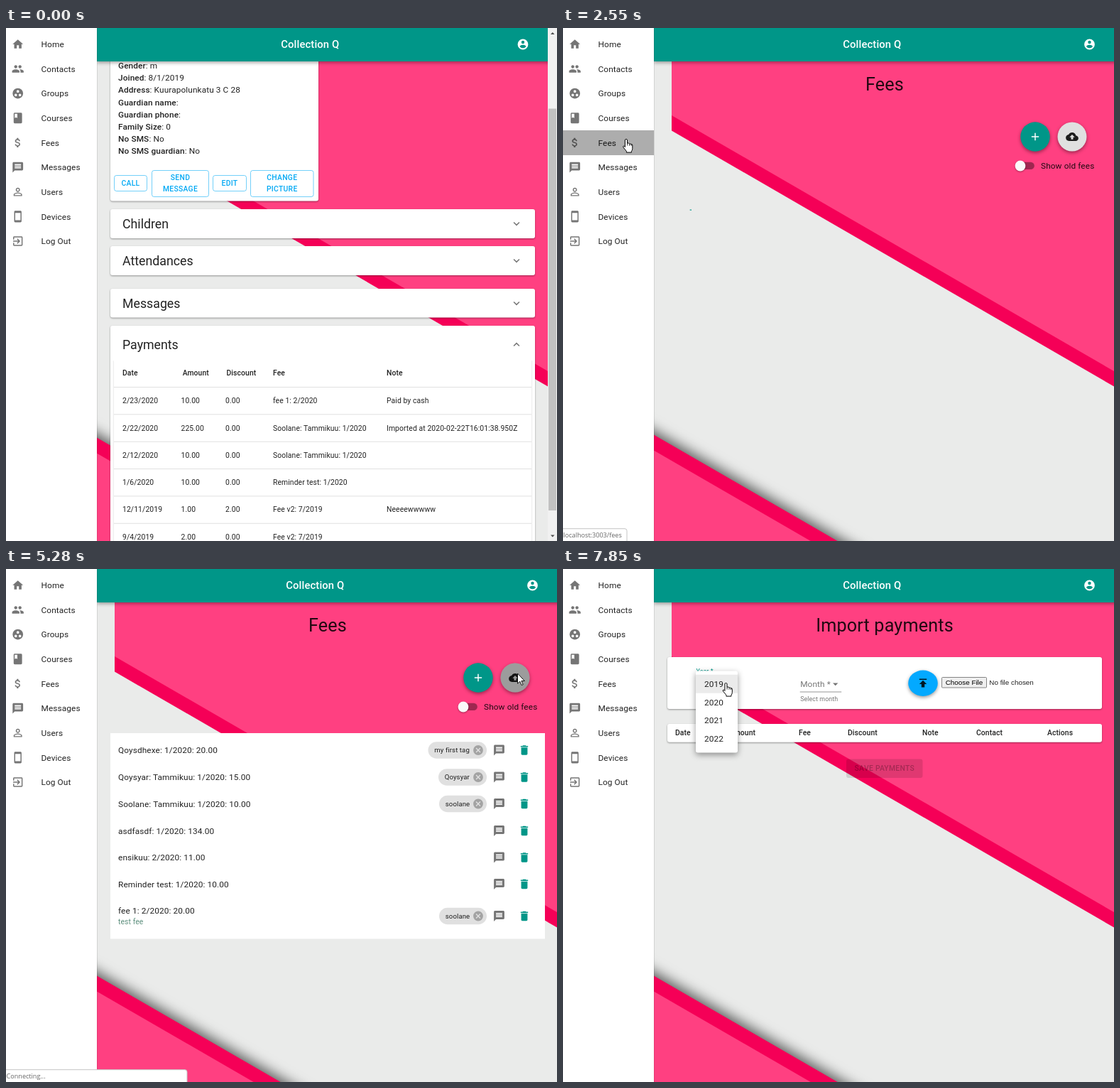
Recreate the animation shown at these times as an HTML page. Size 776 px wide and 722 px high, loop 8000 ms.

```html
<!DOCTYPE html>
<html lang="en">
<head>
<meta charset="utf-8">
<title>Fees</title>
<style>
html, body { margin: 0; width: 100%; height: 100%; overflow: hidden; background: #eaebea; }
svg { display: block; width: 776px; height: 722px; }
text { font-family: Roboto, sans-serif; letter-spacing: .009em; white-space: pre; }
.h4 { letter-spacing: .007em; }
.h5 { letter-spacing: 0; }
.m { font-weight: 500; }
.btn { font-weight: 500; letter-spacing: .028em; text-anchor: middle; }
.sys { font-family: "Liberation Sans", Arial, sans-serif; letter-spacing: 0; }
.tip { font-family: "Open Sans", sans-serif; letter-spacing: 0; }
.mid { text-anchor: middle; }
.paper { fill: #fff; filter: drop-shadow(0 1px 1px rgba(0,0,0,.38)); }
.fab { filter: drop-shadow(0 2px 2.5px rgba(0,0,0,.4)); }
.bar { filter: drop-shadow(0 2px 2.5px rgba(0,0,0,.35)); }
.pop { filter: drop-shadow(0 3px 4px rgba(0,0,0,.4)); }
.deep { filter: drop-shadow(2px -5px 9px rgba(0,0,0,.6)); }
</style>
</head>
<body>
<svg id="stage" viewBox="0 0 776 722"></svg>
<script>
const INK = 'rgba(0,0,0,.87)', GREY = 'rgba(0,0,0,.54)', TEAL = '#009688', BLUE = '#03a9f4';
const BODY = 11.84, SMALL = 10.36, TINY = 8.88;

const ICONS = {
  home: 'M10 20v-6h4v6h5v-8h3L12 3 2 12h3v8z',
  people: 'M16 11c1.66 0 2.99-1.34 2.99-3S17.66 5 16 5c-1.66 0-3 1.34-3 3s1.34 3 3 3zm-8 0c1.66 0 2.99-1.34 2.99-3S9.66 5 8 5C6.34 5 5 6.34 5 8s1.34 3 3 3zm0 2c-2.33 0-7 1.17-7 3.5V19h14v-2.5c0-2.33-4.67-3.5-7-3.5zm8 0c-.29 0-.62.02-.97.05 1.16.84 1.97 1.97 1.97 3.45V19h6v-2.5c0-2.33-4.67-3.5-7-3.5z',
  groups: 'M12 2a10 10 0 1 0 0 20a10 10 0 1 0 0-20zM8 17.5a2.5 2.5 0 1 1 0-5a2.5 2.5 0 1 1 0 5zM12 10.5a2.5 2.5 0 1 1 0-5a2.5 2.5 0 1 1 0 5zM16 17.5a2.5 2.5 0 1 1 0-5a2.5 2.5 0 1 1 0 5z',
  book: 'M18 2H6c-1.1 0-2 .9-2 2v16c0 1.1.9 2 2 2h12c1.1 0 2-.9 2-2V4c0-1.1-.9-2-2-2zM6 4h5v8l-2.5-1.5L6 12V4z',
  money: 'M11.8 10.9c-2.27-.59-3-1.2-3-2.15 0-1.09 1.01-1.85 2.7-1.85 1.78 0 2.44.85 2.5 2.1h2.21c-.07-1.72-1.12-3.3-3.21-3.81V3h-3v2.16c-1.94.42-3.5 1.68-3.5 3.61 0 2.31 1.91 3.46 4.7 4.13 2.5.6 3 1.48 3 2.41 0 .69-.49 1.79-2.7 1.79-2.06 0-2.87-.92-2.98-2.1h-2.2c.12 2.19 1.76 3.42 3.68 3.83V21h3v-2.15c1.95-.37 3.5-1.5 3.5-3.55 0-2.84-2.43-3.81-4.7-4.4z',
  message: 'M20 2H4c-1.1 0-1.99.9-1.99 2L2 22l4-4h14c1.1 0 2-.9 2-2V4c0-1.1-.9-2-2-2zm-2 12H6v-2h12v2zm0-3H6V9h12v2zm0-3H6V6h12v2z',
  person: 'M12 5.9c1.16 0 2.1.94 2.1 2.1s-.94 2.1-2.1 2.1S9.9 9.16 9.9 8s.94-2.1 2.1-2.1m0 9c2.97 0 6.1 1.46 6.1 2.1v1.1H5.9V17c0-.64 3.13-2.1 6.1-2.1M12 4C9.79 4 8 5.79 8 8s1.79 4 4 4 4-1.79 4-4-1.79-4-4-4zm0 9c-2.67 0-8 1.34-8 4v3h16v-3c0-2.66-5.33-4-8-4z',
  phone: 'M17 1H7c-1.1 0-2 .9-2 2v18c0 1.1.9 2 2 2h10c1.1 0 2-.9 2-2V3c0-1.1-.9-2-2-2zM17 19H7V5h10v14z',
  exit: 'M10.09 15.59L11.5 17l5-5-5-5-1.41 1.41L12.67 11H3v2h9.67l-2.58 2.59zM19 3H5c-1.11 0-2 .9-2 2v4h2V5h14v14H5v-4H3v4c0 1.1.89 2 2 2h14c1.1 0 2-.9 2-2V5c0-1.1-.9-2-2-2z',
  account: 'M12 2a10 10 0 1 0 0 20a10 10 0 1 0 0-20zm0 3a3 3 0 1 1 0 6a3 3 0 1 1 0-6zm0 14.2c-2.5 0-4.71-1.28-6-3.22.03-1.99 4-3.08 6-3.08 1.99 0 5.97 1.09 6 3.08-1.29 1.94-3.5 3.22-6 3.22z',
  add: 'M19 13h-6v6h-2v-6H5v-2h6V5h2v6h6v2z',
  cloud: 'M19.35 10.04C18.67 6.59 15.64 4 12 4 9.11 4 6.6 5.64 5.35 8.04 2.34 8.36 0 10.91 0 14c0 3.31 2.69 6 6 6h13c2.76 0 5-2.24 5-5 0-2.64-2.05-4.78-4.65-4.96zM14 13v4h-4v-4H7l5-5 5 5h-3z',
  trash: 'M6 19c0 1.1.9 2 2 2h8c1.1 0 2-.9 2-2V7H6v12zM19 4h-3.5l-1-1h-5l-1 1H5v2h14V4z',
  cancel: 'M12 2a10 10 0 1 0 0 20a10 10 0 1 0 0-20zm5 13.59L15.59 17 12 13.41 8.41 17 7 15.59 10.59 12 7 8.41 8.41 7 12 10.59 15.59 7 17 8.41 13.41 12 17 15.59z',
  publish: 'M5 4v2h14V4H5zm0 10h4v6h6v-6h4l-7-7-7 7z',
  more: 'M16.59 8.59L12 13.17 7.41 8.59 6 10l6 6 6-6z',
  less: 'M12 8l-6 6 1.41 1.41L12 10.83l4.59 4.58L18 14z',
  drop: 'M7 10l5 5 5-5z'
};

const T = (x, y, size, str, attrs = '') => `<text x="${x}" y="${y}" font-size="${size}" fill="${INK}" ${attrs}>${str}</text>`;
const R = (x, y, w, h, attrs = '') => `<rect x="${x}" y="${y}" width="${w}" height="${h}" ${attrs}/>`;
const C = (x, y, r, attrs = '') => `<circle cx="${x}" cy="${y}" r="${r}" ${attrs}/>`;
const P = (d, attrs = '') => `<path d="${d}" ${attrs}/>`;
const I = (name, x, y, fill = GREY, k = .74) =>
  P(ICONS[name], `fill="${fill}" fill-rule="evenodd" transform="translate(${x - 12 * k} ${y - 12 * k}) scale(${k})"`);
const G = (id, inner, attrs = '') => `<g id="${id}" ${attrs}>${inner}</g>`;
const each = (list, fn) => list.map(fn).join('');
const paper = (x, y, w, h, r = 3) => R(x, y, w, h, `rx="${r}" class="paper"`);

function backdrop(dx, dy, left) {
  const top = x => 123 + (x - 153 - dx) * .5778;
  return P(`M${left} 40H776V${top(776) + 21.5}L${left} ${top(left) + 21.5}z`, 'fill="#f50057"') +
    P(`M${left} 40H776V${top(776)}L${left} ${top(left)}z`, 'fill="#ff4081"') +
    P(`M69 ${538.4 + dy}L429 ${746.4 + dy}H69z`, 'fill="#f50057" class="deep"') +
    P(`M69 ${560.4 + dy}L429 ${768.4 + dy}H69z`, 'fill="#ff4081"');
}

function contactPage() {
  const facts = [['Gender', ' m'], ['Joined', ' 8/1/2019'], ['Address', ' Kuurapolunkatu 3 C 28'], ['Guardian name', ''],
    ['Guardian phone', ''], ['Family Size', ' 0'], ['No SMS', ' No'], ['No SMS guardian', ' No']];
  const buttons = [[152.5, 46, 'CALL'], [205.5, 80, 'SEND', 'MESSAGE'], [291.5, 47, 'EDIT'], [344.5, 88.5, 'CHANGE', 'PICTURE']];
  const panels = [['Children', 255, 41], ['Attendances', 307, 41], ['Messages', 367, 40.5], ['Payments', 419, 320]];
  const cols = [164, 246.5, 309, 376, 536];
  const rows = [
    ['2/23/2020', '10.00', '0.00', 'fee 1: 2/2020', 'Paid by cash'],
    ['2/22/2020', '225.00', '0.00', 'Soolane: Tammikuu: 1/2020', 'Imported at 2020-02-22T16:01:38.950Z'],
    ['2/12/2020', '10.00', '0.00', 'Soolane: Tammikuu: 1/2020', ''],
    ['1/6/2020', '10.00', '0.00', 'Reminder test: 1/2020', ''],
    ['12/11/2019', '1.00', '2.00', 'Fee v2: 7/2019', 'Neeeewwwww'],
    ['9/4/2019', '2.00', '0.00', 'Fee v2: 7/2019', '']];
  const heads = ['Date', 'Amount', 'Discount', 'Fee', 'Note'];
  return backdrop(-13, 4, 147) + paper(147, 30, 293, 213.5) +
    each(facts, ([k, v], i) => T(158, 57.2 + i * 17.12, BODY, `<tspan class="m">${k}</tspan>:${v}`)) +
    each(buttons, ([x, w, a, b]) =>
      R(x, b ? 200.5 : 207.5, w, b ? 37 : 22, `rx="3" fill="none" stroke="${BLUE}" stroke-opacity=".55"`) +
      T(x + w / 2, b ? 214 : 222, SMALL, a, `class="btn" style="fill:${BLUE}"`) +
      (b ? T(x + w / 2, 230, SMALL, b, `class="btn" style="fill:${BLUE}"`) : '')) +
    each(panels, ([name, y, h], i) => paper(147, y, 598, h) +
      T(164, y + (i == 3 ? 33 : 27), 17.76, name, 'class="h5"') +
      I(i == 3 ? 'less' : 'more', 719, y + (i == 3 ? 26.5 : 20.5))) +
    R(152, 467, 588, 270, 'fill="#fff" style="filter:drop-shadow(0 1px 1px rgba(0,0,0,.2))"') +
    R(150, 460, 592, 8, 'fill="#fff"') +
    each(heads, (h, i) => T(cols[i] + (i == 1 ? 2.2 : i == 2 ? 1.5 : 0), 489.3, SMALL, h, 'class="m"')) +
    each(rows, (r, j) => R(152, 505 + j * 38.35, 588, 1, 'fill="#e0e0e0"') +
      each(r, (s, i) => T(cols[i], 528.2 + j * 38.3, SMALL, s)));
}

function feesPage() {
  const items = [
    [255, 'Qoysdhexe: 1/2020: 20.00', 'my first tag', 594.5], [293, 'Qoysyar: Tammikuu: 1/2020: 15.00', 'Qoysyar', 609],
    [330.5, 'Soolane: Tammikuu: 1/2020: 10.00', 'soolane', 610], [368.5, 'asdfasdf: 1/2020: 134.00'],
    [406, 'ensikuu: 2/2020: 11.00'], [443.5, 'Reminder test: 1/2020: 10.00'], [488.5, 'fee 1: 2/2020: 20.00', 'soolane', 610]];
  return backdrop(0, 0, 153) + T(453, 88, 25.16, 'Fees', 'class="h4 mid"') +
    C(665, 153, 20.7, `fill="${TEAL}" class="fab"`) + I('add', 665, 153, '#fff') +
    C(717, 153, 20.5, 'id="fab" fill="#e0e0e0" class="fab"') + I('cloud', 717, 153, INK) +
    C(720.5, 147, 0, 'id="fabRipple" fill="#000" fill-opacity=".28" clip-path="url(#fabClip)"') +
    R(638.7, 188.7, 25.2, 10.4, 'rx="5.2" fill="#000" fill-opacity=".38"') +
    C(644, 194, 7.4, 'fill="#fafafa" style="filter:drop-shadow(0 1px 1px rgba(0,0,0,.35))"') +
    T(673, 197.6, BODY, 'Show old fees') +
    C(166.5, 255.5, 13.3, `id="spin" fill="none" stroke="${TEAL}" stroke-width="2.4"`) +
    G('list', R(147, 231, 612, 289.5, 'fill="#fff"') + each(items, ([y, name, tag, x], i) =>
      T(158, i == 6 ? 485 : y + 4.2, BODY, name) + I('message', 694.5, y) + I('trash', 730, y, TEAL) +
      (tag ? R(x, y - 11.8, 677 - x, 23.6, 'rx="11.8" fill="#e0e0e0"') + T(x + 8.8, y + 3.3, 9.62, tag) +
        I('cancel', 665, y, 'rgba(0,0,0,.27)', .69) : '')) +
      T(158, 500, SMALL, 'test fee', 'style="fill:#5d8f7d"'));
}

function importPage() {
  const heads = [['Date', 158], ['Amount', 234], ['Fee', 332], ['Discount', 401], ['Note', 506], ['Contact', 582], ['Actions', 682]];
  const field = (x, name, help, id) =>
    T(x + .5, 166.4, BODY, name, `id="${id}" style="fill:${GREY}"`) + I('drop', x + 50, 162) +
    R(x, 172.5, 58.5, 1, `id="${id}Line" fill="#000" fill-opacity=".42"`) + T(x + .5, 186, TINY, help, `style="fill:${GREY}"`);
  return backdrop(0, 0, 153) + T(453, 88, 25.16, 'Import payments', 'class="h4 mid"') +
    paper(147, 124, 612, 73) + field(187, 'Year *', 'Select year', 'year') + field(333.7, 'Month *', 'Select month', 'month') +
    '<ellipse cx="507" cy="160.7" rx="20.8" ry="18.2" fill="#03a9ff" class="fab"/>' + I('publish', 507, 160.5, INK) +
    R(533.5, 152.5, 63, 14.5, 'rx="1" fill="#efefef" stroke="#767676" stroke-width=".9"') +
    T(565, 163.3, 9.87, 'Choose File', 'class="sys mid" style="fill:#000"') +
    T(600.3, 163.3, 9.87, 'No file chosen', 'class="sys"') +
    paper(147, 218, 612, 25.7) + each(heads, ([s, x]) => T(x, 234.2, SMALL, s, 'class="m"')) +
    R(399, 267.5, 107.5, 26.5, 'rx="3" fill="#000" fill-opacity=".12"') +
    T(452.8, 284, SMALL, 'SAVE PAYMENTS', 'class="btn" style="fill:rgba(0,0,0,.26)"') +
    G('menu', R(187, 143.5, 59, 115, 'rx="3" fill="#fff" class="pop"') + R(187, 148.7, 59, 26, 'fill="#ebebeb"') +
      each([2019, 2020, 2021, 2022], (y, i) => T(199, 165.8 + i * 25.75, BODY, y)));
}

const links = [['Home', 'home'], ['Contacts', 'people'], ['Groups', 'groups'], ['Courses', 'book'], ['Fees', 'money'],
  ['Messages', 'message'], ['Users', 'person'], ['Devices', 'phone'], ['Log Out', 'exit']];

document.getElementById('stage').innerHTML =
  `<defs><clipPath id="rowClip">${R(0, 144, 128, 35)}</clipPath><clipPath id="fabClip">${C(717, 153, 20.5)}</clipPath></defs>` +
  R(0, 0, 776, 722, 'fill="#eaebea"') +
  G('contact', contactPage()) + G('fees', feesPage()) + G('imports', importPage()) +
  R(128, -6, 660, 53, `fill="${TEAL}" class="bar"`) +
  G('title', T(435.3, 28, 14.8, 'Collection Q', 'class="m mid" style="fill:#fff"')) +
  G('account', I('account', 741.5, 23, '#fff')) +
  G('scroll', R(763, 0, 13, 722, 'fill="#f1f1f1"') + R(764, 113.5, 11, 565.5, 'fill="#c1c1c1"') +
    P('M767 9l2.8-3 2.8 3zM767 713.5l2.8 3 2.8-3z', 'fill="#505050"')) +
  R(0, 0, 128, 722, 'fill="#fff"') + R(128, 0, 1, 722, 'fill="#000" fill-opacity=".1"') +
  R(0, 144, 128, 35, 'id="hover" fill="#ebebeb"') +
  each(links, ([name, icon], i) => I(icon, 16.7, 22.8 + i * 34.65) +
    T(49.5, 27 + i * 34.65, BODY, name, i == 4 ? 'id="feesLink"' : '')) +
  C(89, 156.5, 0, 'id="ripple" fill="#000" clip-path="url(#rowClip)"') +
  G('tip', R(-5, 704.7, 95, 25, 'id="tipBox" rx="3" fill="#fff" stroke="#c4c4c4"') +
    T(.5, 717, 9.1, '', 'id="tipText" class="tip" style="fill:#666"')) +
  G('arrow', P('M0 0V14.2L3.3 11.2 5.6 16.5 7.7 15.6 5.4 10.5H9.8Z', 'fill="#fff" stroke="#000" stroke-width=".9"')) +
  G('hand', P('M-1.6 11V1.4Q-1.6 0 0 0 1.5 0 1.5 1.4V6Q2.2 5.2 3.4 5.6 4.4 5.9 4.5 6.8 6 6 7 7.2 8.8 6.8 8.8 8.6V13Q8.8 15.5 7.4 17V18.6H.4V17Q-1.5 14.5-4 11.5-4.8 10.3-3.8 9.7-2.8 9.2-1.6 11Z',
    'fill="#fff" stroke="#000" stroke-width="1"') + P('M1.6 6V9M4.5 7V9.3M7 7.5V9.5', 'fill="none" stroke="#000" stroke-width=".8"'));

const el = {};
document.querySelectorAll('[id]').forEach(e => el[e.id] = e);
const show = (id, on) => { el[id].style.display = on ? '' : 'none'; };
const set = (id, name, v) => el[id].setAttribute(name, v);
const clamp = v => Math.max(0, Math.min(1, v));
const span = (t, a, b) => clamp((t - a) / (b - a));
const ease = p => p * p * (3 - 2 * p);

// Bursts of screen updates: first, last, count.
const bursts = [[520, 1000, 7], [1140, 1230, 2], [1380, 1380, 1], [1930, 1930, 1], [2160, 2550, 6], [2630, 2950, 5],
  [3010, 3010, 1], [3100, 3250, 3], [3650, 4050, 6], [4210, 4360, 3], [4820, 5140, 5], [5280, 5280, 1],
  [5370, 5510, 3], [5990, 6360, 6], [6670, 7140, 7], [7460, 7850, 6]];

function snap(t) {
  let last = 0;
  for (const [a, b, n] of bursts) {
    if (t < a) break;
    const step = n > 1 ? (b - a) / (n - 1) : 1;
    last = t >= b ? b : a + Math.floor((t - a) / step) * step;
  }
  return last;
}

// Pointer way points: time, x, y.
const way = [[520, 380, 34], [680, 230, 95], [840, 54, 150], [920, 75, 153], [1000, 105, 154], [1230, 105, 154],
  [1380, 89, 156.5], [2870, 89, 156.5], [3010, 115, 156.5], [3100, 230, 168], [3250, 483, 197], [3570, 483, 197],
  [3650, 510, 193], [3730, 580, 180], [3890, 690, 155], [4050, 717, 143], [4210, 718, 144], [4360, 720.5, 147],
  [5910, 720.5, 147], [5990, 690, 165], [6200, 520, 206], [6360, 341.5, 188], [6590, 341.5, 188], [6670, 330, 185],
  [6900, 270, 170], [7140, 236, 156], [7690, 236, 156], [7850, 229.5, 160.5]];

function pointer(t) {
  const i = way.findIndex(w => w[0] > t);
  if (i < 0) return way[way.length - 1].slice(1);
  if (i == 0) return null;
  const [a, x, y] = way[i - 1], [b, u, v] = way[i], p = (t - a) / (b - a);
  return [x + (u - x) * p, y + (v - y) * p];
}

function draw(now) {
  const t = snap(now % 8000);
  const first = t < 2470, third = t >= 5370;
  show('contact', first);
  show('scroll', first);
  show('fees', !first && !third);
  show('imports', third);
  set('title', 'transform', `translate(${first ? -7 : 0})`);
  set('account', 'transform', `translate(${first ? -13.5 : 0})`);

  show('hover', t >= 760 && t < 3100);
  set('ripple', 'r', t < 1930 ? 0 : 10 + 90 * span(t, 1930, 2320));
  set('ripple', 'fill-opacity', .265 * (1 - span(t, 2560, 2950)));
  el.feesLink.style.fill = t == 3010 ? '#3f6354' : INK;

  const turn = t - 2550;
  show('spin', turn >= 0);
  set('spin', 'stroke-dasharray', `${1.2 + 60 * ease(clamp(turn / 700))} 200`);
  set('spin', 'transform', `rotate(${turn * 360 / 1400} 166.5 255.5)`);
  show('list', t >= 3010);
  set('fab', 'fill', t >= 3880 ? '#d8d8d8' : '#e0e0e0');
  set('fabRipple', 'r', t < 4820 ? 0 : 6 + 32 * span(t, 4820, 5140));

  const busy = t >= 4900;
  show('tip', (t >= 1140 && t < 4820) || (busy && t < 5370));
  el.tip.style.opacity = t < 1230 ? .5 : 1;
  el.tipText.textContent = busy ? 'Connecting...' : 'localhost:3003/fees';
  set('tipBox', 'width', busy ? 260 : 95);

  const open = t >= 7460, p = open ? ease(span(t, 7400, 7650)) : 0;
  set('year', 'y', 166.4 - 19.6 * p);
  set('year', 'font-size', BODY * (1 - .25 * p));
  el.year.style.fill = open ? TEAL : GREY;
  set('yearLine', 'fill', open ? TEAL : '#000');
  set('yearLine', 'fill-opacity', t >= 7060 ? .87 : .42);
  show('menu', open);
  el.menu.style.opacity = p;
  const k = .75 + .25 * p;
  set('menu', 'transform', `translate(216 161) scale(${k} ${k * k}) translate(-216 -161)`);

  const pos = pointer(t);
  const hand = (t >= 760 && t < 3100) || (t >= 3880 && t < 5280) || t >= 6980;
  show('hand', pos && hand);
  show('arrow', pos && !hand);
  if (pos) set(hand ? 'hand' : 'arrow', 'transform', `translate(${pos})`);
}

const start = performance.now();
function tick() {
  draw(performance.now() - start);
  requestAnimationFrame(tick);
}
tick();
</script>
</body>
</html>
```
